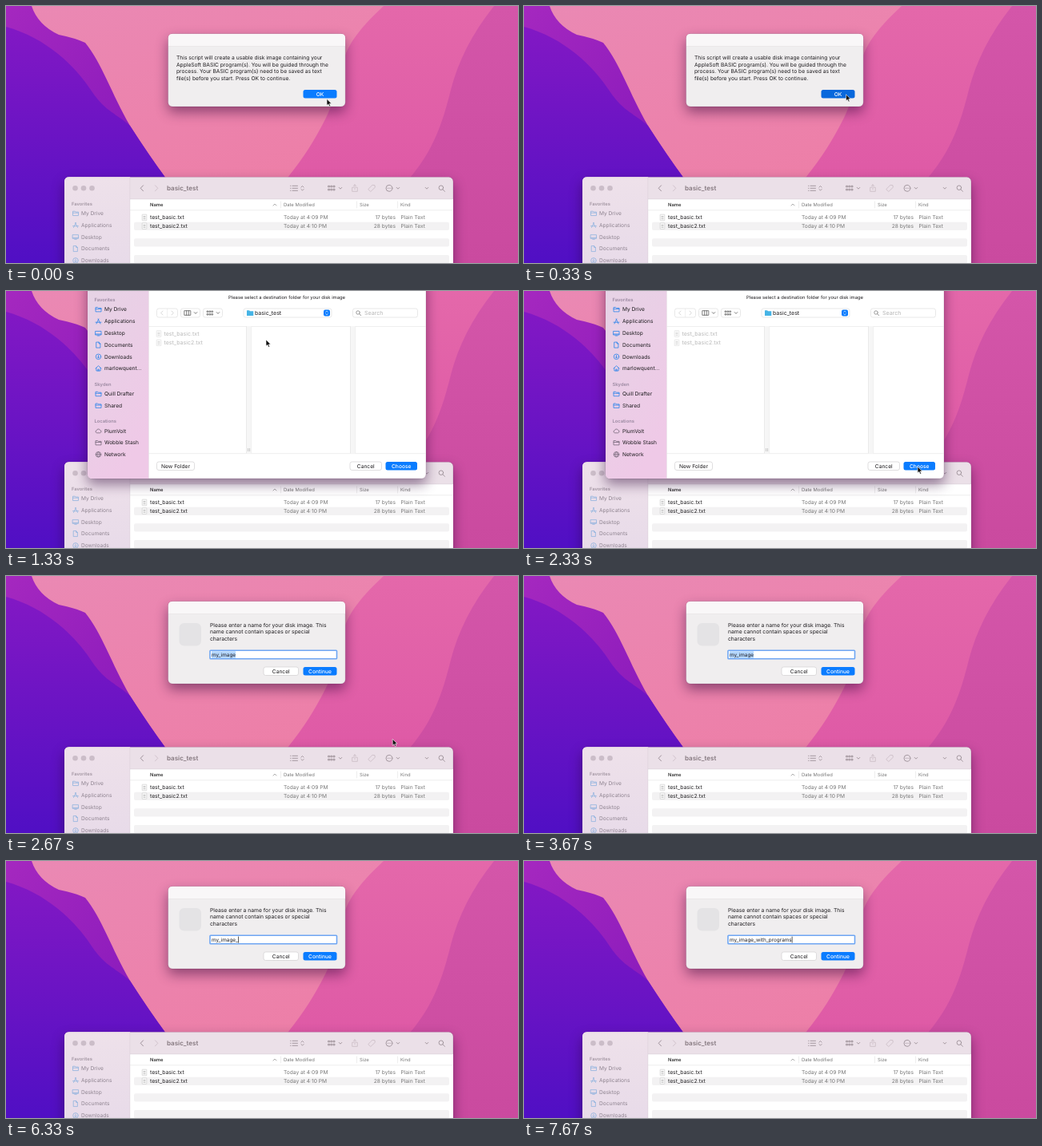
An HTML page that plays this animation: 640 px wide and 322 px high, repeating every 8000 ms.

```html
<!DOCTYPE html>
<html lang="en">
<head>
<meta charset="utf-8">
<title>Disk image script</title>
<style>
html, body { margin: 0; width: 100%; height: 100%; overflow: hidden; }
svg { display: block; width: 100%; height: 100%; }
text { font-family: Inter, "Noto Sans", sans-serif; text-rendering: geometricPrecision; white-space: pre; }
.icon { fill: none; stroke-width: .8; stroke-linecap: round; stroke-linejoin: round; }
.shadow { filter: drop-shadow(0 7px 8px rgba(40, 0, 50, .48)); }
</style>
</head>
<body>
<svg id="stage" viewBox="0 0 640 322" preserveAspectRatio="none"></svg>
<script>
const LOOP = 8000;
const BLUE = '#0a7cff', SIDE_BLUE = '#2b83ea', INK = '#1d1b1e';
const GLYPHS = {
  folder: 'M-3.5 2.5V-2.5H-.8L0-1.6H3.5V2.5ZM-3.5-.5H3.5',
  apps: 'M-2.5 3L.4-3M2.5 3L-.4-3M-3.5 1.2H3.5',
  desktop: 'M-3.5-2.6H3.5V2H-3.5ZM-3.5 1H3.5M-1.3 3H1.3',
  doc: 'M-2.4-3.5H.6L2.4-1.6V3.5H-2.4ZM.6-3.5V-1.6H2.4',
  down: 'M3.3 0A3.3 3.3 0 1 1-3.3 0A3.3 3.3 0 1 1 3.3 0M0-1.7V1.6M-1.3.4L0 1.7L1.3.4',
  home: 'M-3.6 0L0-3.3L3.6 0M-2.6-.7V3H2.6V-.7M-.6 3V1H.6V3',
  cloud: 'M-2.3 2.3A1.6 1.6 0 0 1-2.2-.8A2.3 2.3 0 0 1 2.1-1A1.7 1.7 0 0 1 2.3 2.3Z',
  globe: 'M3.3 0A3.3 3.3 0 1 1-3.3 0A3.3 3.3 0 1 1 3.3 0M-3.3 0H3.3M0-3.3C-2-1-2 1 0 3.3C2 1 2-1 0-3.3',
  left: 'M1.5-3.5L-1.8 0L1.5 3.5',
  right: 'M-1.5-3.5L1.8 0L-1.5 3.5',
  caret: 'M-1.8-.9L0 .9L1.8-.9',
  upDown: 'M-1.6-1.2L0-2.8L1.6-1.2M-1.6 1.2L0 2.8L1.6 1.2',
  list: 'M-4.5-3H-4M-4.5 0H-4M-4.5 3H-4M-2-3H4.5M-2 0H4.5M-2 3H4.5',
  grid: 'M-4-3H-2.4V-1.4H-4ZM-.8-3H.8V-1.4H-.8ZM2.4-3H4V-1.4H2.4ZM-4 1H-2.4V2.6H-4ZM-.8 1H.8V2.6H-.8ZM2.4 1H4V2.6H2.4Z',
  columns: 'M-3.8-2.8H3.8V2.8H-3.8ZM-1.3-2.8V2.8M1.3-2.8V2.8',
  share: 'M-1.5-1H-3.3V4H3.3V-1H1.5M0 1.5V-4.5M-1.7-2.8L0-4.5L1.7-2.8',
  tag: 'M-4 1L1-4L4-3.6L4.3-1L-1 4Z',
  more: 'M4 0A4 4 0 1 1-4 0A4 4 0 1 1 4 0M-2 0H-1.8M-.1 0H.1M1.8 0H2',
  search: 'M2.2-.6A2.8 2.8 0 1 1-3.4-.6A2.8 2.8 0 1 1 2.2-.6M1.4 1.4L4 4'
};

// y is the vertical middle of the capitals
const text = (x, y, str, size = 6.6, fill = INK, extra = '') =>
  `<text x="${x}" y="${y}" dy=".36em" font-size="${size}" fill="${fill}" ${extra}>${str}</text>`;
const rect = (x, y, w, h, fill, r = 0, extra = '') =>
  `<rect x="${x}" y="${y}" width="${w}" height="${h}" rx="${r}" fill="${fill}" ${extra}/>`;
const icon = (name, x, y, color, scale = 1) =>
  `<path class="icon" d="${GLYPHS[name]}" stroke="${color}" transform="translate(${x} ${y}) scale(${scale})"/>`;
const path = (d, fill) => `<path d="${d}" fill="${fill}"/>`;
const gradient = (id, from, to, x2, y2) =>
  `<linearGradient id="${id}" x1="0" y1="0" x2="${x2}" y2="${y2}">
    <stop stop-color="${from}"/><stop offset="1" stop-color="${to}"/></linearGradient>`;
const sheet = (x, y, w, h, fill) =>
  `<g class="shadow">${rect(x, y, w, h, fill, 5.5, 'stroke="#5a2050" stroke-opacity=".3" stroke-width=".6"')}</g>`;
const box = (x, y, w, h) => rect(x, y, w, h, '#fff', 2.5, 'stroke="#dedede" stroke-width=".7"');
const button = (x, y, w, label, primary, id = '') =>
  rect(x, y, w, 10.5, primary ? BLUE : '#fff', 2.5, primary ? `id="${id}"` : 'stroke="#d2d0d2" stroke-width=".7"') +
  text(x + w / 2, y + 5.2, label, 6.7, primary ? '#fff' : INK, `text-anchor="middle" font-weight="${primary ? 500 : 400}"`);
const heading = (x, y, label, color) => text(x, y, label, 5.8, color, 'font-weight="600"');
const fileIcon = (x, y) => rect(x - 2.8, y - 3.8, 5.6, 7.6, '#fff', .5, 'stroke="#c4c4c4" stroke-width=".6"') +
  `<path d="M${x - 1.5} ${y - 1.5}h3M${x - 1.5} ${y}h3M${x - 1.5} ${y + 1.8}h3" stroke="#aaa" stroke-width=".7"/>`;

const wallpaper = () => `<defs>
    ${gradient('pink', '#ea89b4', '#ee7ba3', .6, 1)}
    ${gradient('rose', '#e468aa', '#dc53a4', 0, 1)}
    ${gradient('magenta', '#d456a9', '#ca4a9f', 0, 1)}
    ${gradient('outer', '#a528bf', '#8016bb', .6, 1)}
    ${gradient('inner', '#8218c4', '#500fc4', 0, 1)}
    ${gradient('sidebar', '#e6d3e5', '#efc9e7', .5, 1)}
    ${gradient('finderSide', '#eee1ea', '#e8dbe9', 0, 1)}
  </defs>` +
  rect(0, 0, 640, 322, 'url(#pink)') +
  path('M472 0C445 25 430 45 424 62C414 100 410 120 400 140C386 168 372 190 352 215V322H640V0Z', 'url(#rose)') +
  path('M610 0C582 35 565 70 556 105C546 145 535 180 505 215V322H640V0Z', 'url(#magenta)') +
  path('M0 0H32Q40 24 66 36Q86 40 99 46C120 72 132 110 155 150Q178 186 200 216V322H0Z', 'url(#outer)') +
  path('M0 26C50 40 86 74 108 108C124 132 140 136 155 150Q178 186 200 216V322H0Z', 'url(#inner)');

function finder() {
  const grey = '#94878f', pale = '#c9bbc5', side = '#8f8490', sideIcon = '#90b3df';
  const tools = [['left', 170, '#8b7e87'], ['right', 188, pale], ['list', 360, grey], ['upDown', 370.5, grey],
    ['grid', 407, grey], ['caret', 418, grey], ['share', 436, pale], ['tag', 457, pale],
    ['more', 479, grey], ['caret', 490, grey], ['caret', 526, grey], ['search', 544.5, grey]];
  const places = [['folder', 'My Drive'], ['apps', 'Applications'], ['desktop', 'Desktop'],
    ['doc', 'Documents'], ['down', 'Downloads']];
  const files = [['test_basic.txt', '4:09', 17], ['test_basic2.txt', '4:10', 28]];
  const headers = [[347, 'Date Modified'], [442, 'Size'], [493, 'Kind']];
  return sheet(73, 214.3, 486, 120, '#ebe0e8') +
    path('M73 322V220Q73 214.3 79 214.3H155V322Z', 'url(#finderSide)') +
    rect(155, 242, 404, 80, '#fff') + rect(155, 241.6, 404, .6, '#d8ccd5') + rect(154.6, 214.3, .6, 108, '#ddd0da') +
    [86.5, 97, 107.5].map(x => `<circle cx="${x}" cy="228.3" r="3.3" fill="#cbbdc8"/>`).join('') +
    tools.map(([name, x, color]) => icon(name, x, 228.3, color)).join('') +
    text(201, 228.3, 'basic_test', 8, '#85787f', 'font-weight="600"') +
    heading(82, 247.5, 'Favorites', '#a295a1') +
    places.map(([name, label], i) => {
      const y = 259.7 + i * 14.8;
      return icon(name, 87, y, sideIcon) + text(94, y, label, 6.6, side);
    }).join('') +
    heading(180, 249, 'Name', '#333') +
    `<path class="icon" d="M334 250L336 248L338 250" stroke="#999"/>` +
    headers.map(([x, label]) => rect(x - 4, 244.5, .5, 9, '#ddd') + text(x, 249, label, 5.85, '#777')).join('') +
    rect(155, 255.6, 404, .6, '#e2e2e2') +
    [270.7, 291.3, 312].map(y => rect(160, y, 394, 10.3, '#f3f2f3', 2)).join('') +
    files.map(([name, time, size], i) => {
      const y = 265 + i * 10.6;
      return fileIcon(173, y) + text(180, y, name, 6.8) +
        text(347, y, `Today at ${time} PM`, 6.65, '#777') +
        text(487, y, `${size} bytes`, 6.65, '#777', 'text-anchor="end"') + text(493.5, y, 'Plain Text', 6.65, '#777');
    }).join('');
}

function panel(y, bottom, lines, textX, firstLine, size) {
  return sheet(202.6, y - .3, 221.6, bottom - y + .4, '#f0eeef') +
    path(`M203 ${y + 15}v-10q0-5 5-5h211q5 0 5 5v10z`, '#f9f7f8') + rect(203, y + 15, 221, .5, '#e4e1e3') +
    lines.map((line, i) => text(textX, firstLine + i * 8.4, line, size)).join('');
}

const intro = () => panel(35, 126, [
    'This script will create a usable disk image containing your',
    'AppleSoft BASIC program(s). You will be guided through the',
    'process. Your BASIC program(s) need to be saved as text',
    'file(s) before you start. Press OK to continue.'
  ], 213, 65, 6.7) + button(371.5, 105, 42, 'OK', true, 'ok');

const naming = () => panel(32, 135, [
    'Please enter a name for your disk image. This',
    'name cannot contain spaces or special',
    'characters'
  ], 255, 61.6, 6.75) +
  rect(216.5, 59, 27.5, 28.5, '#e4e3e5', 6) +
  rect(255, 93.2, 158.5, 10.6, '#fff', .8, 'stroke="#6ea6f3" stroke-width="1.6"') +
  rect(257, 94.3, 0, 8.6, '#b3d6fd', 0, 'id="selection"') +
  text(257, 98.6, '', 6.4, INK, 'id="entry"') + rect(0, 94.6, .7, 8, '#111', 0, 'id="caret"') +
  button(322, 114, 43.5, 'Cancel') + button(371.5, 114, 42, 'Continue', true);

function chooser() {
  const places = [['folder', 23, 'My Drive'], ['apps', 38, 'Applications'], ['desktop', 53, 'Desktop'],
    ['doc', 67.6, 'Documents'], ['down', 82.3, 'Downloads'], ['home', 97, 'marlowquent...'],
    ['folder', 128.8, 'Quill Drafter'], ['folder', 143.5, 'Shared'],
    ['cloud', 175.4, 'PlumVolt'], ['folder', 190, 'Wobble Stash']];
  const place = ([name, y, label]) =>
    icon(name, 115.5, y, y > 170 ? '#76697a' : SIDE_BLUE) + text(123, y, label);
  const faint = '#b8b8b8', dark = '#5c5c5c';
  return sheet(102, -20, 423, 255, '#fff') +
    path('M102 0H178V235H108Q102 235 102 229Z', 'url(#sidebar)') + rect(178, 0, .5, 235, '#dccbd9') +
    [[11, 'Favorites'], [116.5, 'Skyden'], [163, 'Locations']].map(([y, label]) => heading(110.5, y, label, '#9a88a0')).join('') +
    places.map(place).join('') + `<g id="network">${place(['globe', 204.8, 'Network'])}</g>` +
    text(351, 7.5, 'Please select a destination folder for your disk image', 5.85, INK, 'text-anchor="middle"') +
    box(188.5, 22, 26, 11) + rect(201.3, 22, .5, 11, '#e3e3e3') +
    icon('left', 195, 27.5, faint, .7) + icon('right', 208, 27.5, faint, .7) +
    box(218.5, 22, 24, 11) + icon('columns', 227, 27.5, dark) + icon('caret', 237, 27.5, dark) +
    box(246.5, 22, 24, 11) + icon('grid', 255, 27.7, dark, .9) + icon('caret', 265, 27.5, dark) +
    box(297, 22, 110, 11) + path('M301 24.2h3l1 1h4.3v5.8h-8.3z', '#46b4e6') + text(311, 27.5, 'basic_test', 7) +
    rect(397, 23.5, 8, 8, BLUE, 2) + icon('upDown', 401, 27.5, '#fff', .85) +
    box(433.5, 22, 81, 11) + icon('search', 440.5, 27.5, '#666', .8) + text(448, 27.5, 'Search', 7.1, '#b5b5b5') +
    rect(178, 44, 347, .6, '#e4e4e4') + rect(178, 203.5, 347, .6, '#e4e4e4') +
    [300, 430].map(x => rect(x, 44, 7, 159.5, '#f6f6f6') + rect(x, 44, .6, 159.5, '#e3e3e3') +
      rect(x + 6.6, 44, .5, 159.5, '#ececec')).join('') +
    `<path d="M302.6 197v4M304.6 197v4" stroke="#aaa" stroke-width=".6"/>` +
    ['test_basic.txt', 'test_basic2.txt'].map((name, i) => {
      const y = 53.5 + i * 11.4;
      return `<g opacity=".65">${fileIcon(191, y)}</g>` + text(197.5, y, name, 7, '#b9b9b9');
    }).join('') +
    button(188.5, 214, 47, 'New Folder') + button(430, 214, 39.5, 'Cancel') + button(474.5, 214, 39.5, 'Choose', true);
}

const group = (id, content) => `<g id="${id}">${content}</g>`;
document.getElementById('stage').innerHTML = wallpaper() + finder() +
  group('intro', intro()) + group('chooser', chooser()) + group('naming', naming()) +
  group('pointer', `<path d="M0 0V8L1.9 6.4L3.2 9.3L4.6 8.7L3.3 5.9L5.8 5.7Z" fill="#111" stroke="#fff" stroke-width=".6"/>`);

const pointerSteps = [[0, [401, 116.5]], [330, [402.5, 110.8]], [670, [323, 79.8]], [1000, [323, 42]],
  [1330, [325, 61]], [1670, [439, 72]], [2000, [483, 216]], [2330, [492, 220]],
  [2670, [483.2, 204.3]], [3000, [483.2, 201]], [3330, null]];
const entrySteps = [[0, 'my_image'], [4670, 'my_image_'], [6670, 'my_image_with'], [7000, 'my_image_with_'],
  [7330, 'my_image_with_prog'], [7670, 'my_image_with_programs']];
const caretSteps = [[0, false], [4000, true], [5330, false], [5670, true], [6000, false], [6330, true]];

const el = id => document.getElementById(id);
const show = (id, visible) => { el(id).style.display = visible ? '' : 'none'; };
const valueAt = (steps, t) => steps.filter(([start]) => start <= t).pop()[1];

function draw() {
  const t = performance.now() % LOOP;
  show('intro', t < 670);
  show('chooser', t >= 670 && t < 2670);
  show('naming', t >= 2670);
  show('network', t >= 1000);
  el('ok').setAttribute('fill', t < 330 ? BLUE : '#0868dc');

  const pointer = valueAt(pointerSteps, t);
  show('pointer', pointer);
  if (pointer) el('pointer').setAttribute('transform', `translate(${pointer})`);

  if (t >= 2670) {
    el('entry').textContent = valueAt(entrySteps, t);
    const width = el('entry').getComputedTextLength();
    el('selection').setAttribute('width', t < 4000 ? width : 0);
    el('caret').setAttribute('x', 257 + width);
    show('caret', valueAt(caretSteps, t));
  }
  requestAnimationFrame(draw);
}
draw();
</script>
</body>
</html>
```
